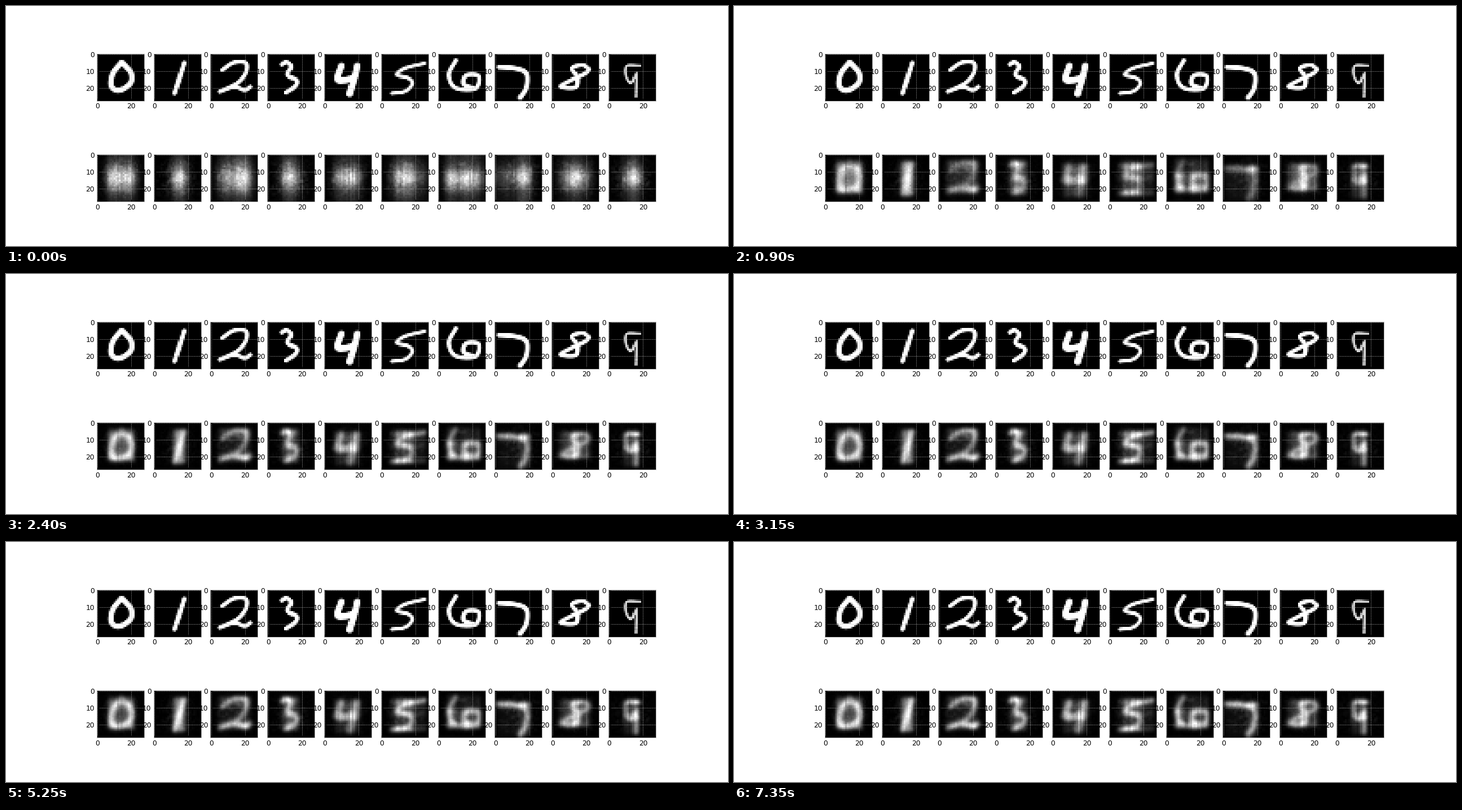
Recreate the animation shown at these times as a matplotlib script. Size 1280 by 427 pixels, loop 7.5 s.

```python
import numpy as np
import matplotlib.pyplot as plt
from matplotlib.animation import FuncAnimation

W, H, DPI, FRAMES, N = 1280, 427, 80, 50, 28

plt.rcParams.update({
    "font.family": "DejaVu Sans", "font.size": 11,
    "xtick.labelsize": 11, "ytick.labelsize": 11,
    "xtick.direction": "in", "ytick.direction": "in",
    "axes.edgecolor": "#bcbcbc", "axes.linewidth": 0.8,
    "axes.grid": True, "axes.axisbelow": True,
    "grid.color": "#b2b2b2", "grid.linestyle": "--", "grid.linewidth": 0.5,
})

cell = np.arange(N) + 0.5
X, Y = np.meshgrid(cell, cell)


def smooth(pts, n=20):
    """Catmull-Rom curve through the points."""
    p = np.array(pts, float)
    p = np.vstack([2 * p[0] - p[1], p, 2 * p[-1] - p[-2]])
    t = np.linspace(0, 1, n)[:, None]
    return np.vstack([
        0.5 * (2 * b + (c - a) * t + (2 * a - 5 * b + 4 * c - d) * t**2
               + (3 * b - a - 3 * c + d) * t**3)
        for a, b, c, d in zip(p, p[1:], p[2:], p[3:])])


def glyph(half, *strokes, tone=1.0):
    """Handwritten digit: pen strokes on a 28 x 28 grid."""
    c = np.vstack([smooth(s) for s in strokes])
    d = np.hypot(X[..., None] - c[:, 0], Y[..., None] - c[:, 1]).min(-1)
    return tone * np.clip((half - d) * 1.4 + 0.5, 0, 1)


digits = [
    glyph(1.6, [(14.5, 5.5), (9.5, 12), (8.5, 19), (13, 21.7), (19.5, 17.5),
                (20, 12), (17, 8), (14.5, 5.5)]),
    glyph(1.35, [(17.7, 5.8), (12.3, 23.3)]),
    glyph(1.2, [(7, 10), (14, 5.5), (20.8, 5.9), (20.5, 12), (15, 18), (5.7, 22.4)],
          [(5.7, 22.4), (14, 19.7), (20, 21.5), (23.4, 19.6)]),
    glyph(1.25, [(8.7, 6.6), (11.5, 5.3), (14, 8), (12, 12.7), (17.2, 16),
                 (16, 19.5), (11.2, 23)]),
    glyph(1.9, [(10.2, 7.5), (7.9, 15), (12, 15.8), (16.5, 14.8)],
          [(19.2, 7.5), (18, 13), (14.9, 23.7)]),
    glyph(1.05, [(25.4, 6), (14.5, 8.7), (9.3, 12.6), (15.3, 14.4), (18.2, 17.5),
                 (14, 22.3), (6.5, 23.4)]),
    glyph(1.25, [(10.5, 4.3), (6.4, 12.7), (10.3, 20.2), (21.7, 20.6), (23.6, 13.5),
                 (16.5, 13), (15, 18), (21, 20.5)]),
    glyph(1.4, [(2.8, 8.2), (12.3, 9), (18.5, 12), (18.5, 20), (15, 26)]),
    glyph(1.2, [(22, 9.5), (18, 7), (12.2, 9), (15.2, 14.5), (13.8, 20), (5.5, 19.5),
                (10.5, 16.3), (19.5, 12), (22, 9.5)]),
    glyph(0.75, [(18.2, 7.4), (11, 7.5), (10.3, 13), (13.2, 17.3), (16.3, 12)],
          [(16.4, 12), (16, 25.3)], tone=0.85),
]


def blur(img, sigma):
    g = np.exp(-((cell - cell[:, None]) / sigma)**2 / 2)
    g /= g.sum(1, keepdims=True)
    return g @ img @ g.T


def unit(a):
    return a / a.max()


def rebuilt(d, step):
    """Reconstruction that learns the rows and columns first, then the shape."""
    learn = 1 - np.exp(-step / 2.5)
    detail = 0.45 * (1 - np.exp(-step / 8))
    soft = blur(digits[d], 2.2 - 1.1 * learn)
    rows, cols = unit(soft.sum(1)), unit(soft.sum(0))

    core = np.exp(-((cell - 14) / 5)**2)
    first = np.outer(unit(0.3 + core + 0.4 * rows), cols)
    later = (1 - detail) * unit(np.outer(rows, cols)) + detail * unit(soft)
    img = (1 - learn) * first + learn * later

    fixed, now = np.random.default_rng(d), np.random.default_rng(100 * step + d + 10)
    jitter = 0.02 + 0.04 * np.exp(-step / 6)
    streaks = 0.07 * fixed.normal(size=N) + jitter * now.normal(size=N)
    grain = jitter * now.normal(size=(N, N))
    halo = np.exp(-((X - 14)**4 + (Y - 14)**4) / 11**4)
    haze = np.abs(blur(fixed.normal(size=(N, N)), 0.8)) * (0.1 + 0.15 * (1 - learn))
    return unit(np.clip(img * (1 + streaks + grain) + haze * halo, 0, None))


fig, axes = plt.subplots(2, 10, figsize=(W / DPI, H / DPI), dpi=DPI)
fig.subplots_adjust(left=160.7 / W, right=0.9, bottom=0.1087, top=0.8787)


def show(ax, img):
    ax.set_xticks([0, 20])
    ax.set_yticks([0, 10, 20])
    return ax.imshow(img, cmap="gray", vmin=0, vmax=1, interpolation="nearest")


for ax, img in zip(axes[0], digits):
    show(ax, img)
outputs = [show(ax, rebuilt(d, 0)) for d, ax in enumerate(axes[1])]


def update(step):
    for d, im in enumerate(outputs):
        im.set_data(rebuilt(d, step))
    return outputs


anim = FuncAnimation(fig, update, frames=FRAMES, interval=150,
                     repeat=True, repeat_delay=0, blit=False)
plt.show()
```
